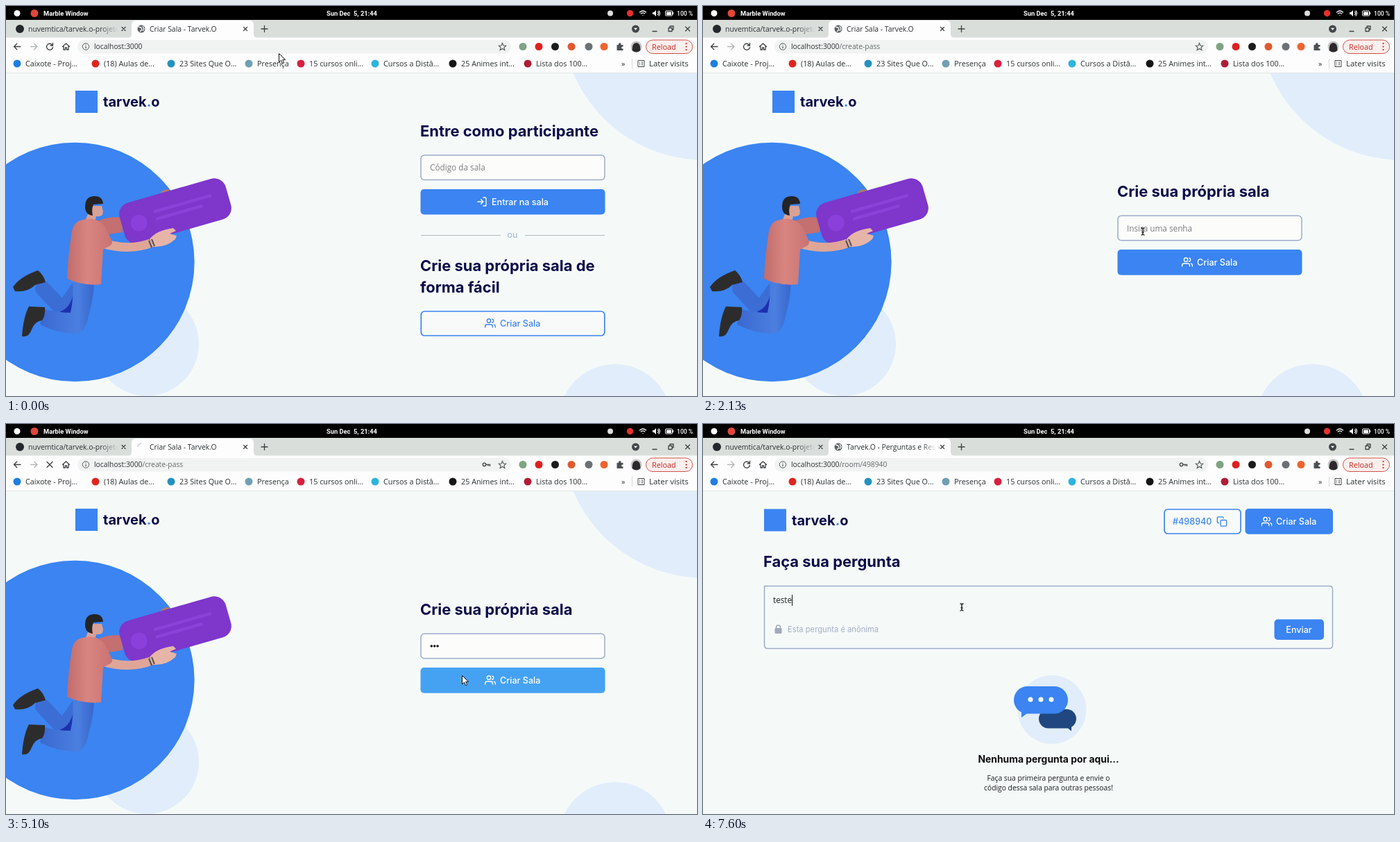
Recreate the animation shown at these times as an HTML page. Size 996x562 px, loop 8 s.

```html
<!DOCTYPE html>
<html lang="pt">
<head>
<meta charset="utf-8">
<title>Sala</title>
<style>
html, body { margin: 0; width: 100%; height: 100%; overflow: hidden; background: #f5faf9; }
svg { display: block; }
#stage { width: 100vw; height: 100vh; }
text { font-optical-sizing: none; white-space: pre; }
.ui { font: 10.8px "Open Sans", sans-serif; fill: #2c2f33; }
.tab { font-size: 10.4px; }
.bar { font: 700 9.3px Roboto, sans-serif; fill: #fff; }
.title { font: 700 21.95px Inter, sans-serif; fill: #0b0b48; }
.brand { font: 700 20px Inter, sans-serif; fill: #0b0b48; }
.label { font: 500 12.6px Inter, sans-serif; fill: currentColor; }
.input { font: 11.75px "Open Sans", sans-serif; fill: #7b7d80; }
.note { font: 10.3px "Open Sans", sans-serif; fill: #17181a; text-anchor: middle; }
.line { fill: none; stroke: currentColor; stroke-linecap: round; stroke-linejoin: round; }
.field { fill: #fcfdfb; stroke: #9dabc9; stroke-width: 1.5; }
.solid { fill: #3b84f1; }
.hover .solid { fill: #45a2f3; }
.outline { fill: #f7faf8; stroke: currentColor; stroke-width: 1.7; }
.hover .outline { fill: #fdfefd; }
.white { color: #fff; }
.blue { color: #3b84f1; }
.blue.hover { color: #45a2f3; }
.pale { fill: #e1edfa; }
</style>
</head>
<body>
<svg id="stage" viewBox="0 0 996 562" preserveAspectRatio="none">
<defs>
  <symbol id="users" viewBox="0 0 24 24"><path class="line" stroke-width="2" d="M17 21v-2a4 4 0 0 0-4-4H5a4 4 0 0 0-4 4v2M23 21v-2a4 4 0 0 0-3-3.9M16 3.1a4 4 0 0 1 0 7.8M13 7a4 4 0 1 1-8 0a4 4 0 1 1 8 0"/></symbol>
  <symbol id="enter" viewBox="0 0 24 24"><path class="line" stroke-width="2" d="M15 3h4a2 2 0 0 1 2 2v14a2 2 0 0 1-2 2h-4M10 17l5-5-5-5M15 12H3"/></symbol>
  <symbol id="copy" viewBox="0 0 24 24"><path class="line" stroke-width="2" d="M11 9h9a2 2 0 0 1 2 2v9a2 2 0 0 1-2 2h-9a2 2 0 0 1-2-2v-9a2 2 0 0 1 2-2M5 15H4a2 2 0 0 1-2-2V4a2 2 0 0 1 2-2h9a2 2 0 0 1 2 2v1"/></symbol>
  <linearGradient id="shirt"><stop stop-color="#c06c6c"/><stop offset=".45" stop-color="#d88581"/><stop offset="1" stop-color="#c97372"/></linearGradient>
  <linearGradient id="jeans"><stop stop-color="#3a68cf"/><stop offset=".7" stop-color="#4b7fe0"/><stop offset="1" stop-color="#3766cb"/></linearGradient>
  <linearGradient id="fadeIdle"><stop stop-color="#dadedb" stop-opacity="0"/><stop offset="1" stop-color="#dadedb"/></linearGradient>
  <linearGradient id="fadeActive"><stop stop-color="#fcfdfc" stop-opacity="0"/><stop offset="1" stop-color="#fcfdfc"/></linearGradient>
</defs>
<rect width="996" height="562" fill="#f5faf9"/>

<g id="landing">
  <circle class="pale" cx="1007" cy="16" r="206"/>
  <circle class="pale" cx="878" cy="597" r="81"/>
  <circle class="pale" cx="203" cy="487" r="75"/>
  <circle class="solid" cx="99.3" cy="369" r="172.3"/>
  <!-- figure carrying the card -->
  <path d="M222 271q4-9 14-6l2 8-14 5z" fill="#b07a72"/>
  <path d="M130 311q17-9 38-6v21l-34 5z" fill="#c46f70"/>
  <g transform="rotate(-16 244 295.5)">
    <rect x="164.5" y="265" width="159" height="61" rx="17" fill="#7e36cb"/>
    <circle cx="189" cy="297.5" r="12" fill="#8b3fdb"/>
    <path class="line" d="M216 288h82M216 299h66" stroke-width="4.5" style="color:#8a42d9"/>
  </g>
  <path class="line" d="M53 407L82 438 103 408" stroke-width="22" style="color:#3c6dd4"/>
  <path d="M78 440q17-4 22-38l-1 42q-11 8-21-4z" fill="#1d31ae"/>
  <path d="M96 394l31 4q-1 24-8 48-4 24-18 26-26 0-52-13l7-22q18 5 37 5 5-22 3-48z" fill="url(#jeans)"/>
  <path d="M10 405Q20 390 46 381q8 6 11 17l-15 4q-11 11-29 9z" fill="#2d2c2c"/>
  <path d="M23 476Q25 448 33 433l23 1q1 12-4 19-10 1-15 13-4 12-14 10z" fill="#2d2c2c"/>
  <path d="M119 288h19l2 8-1 5q-3 3-9 2l-2 9-14-2 4-10z" fill="#d9a196"/>
  <path d="M114 289q0-15 14-15 11 0 12 11l-14 1q-3 7-1 16-11-1-11-13z" fill="#242426"/>
  <path d="M137 333q35 15 69 3l9 10q-36 15-79 2z" fill="#dfa698"/>
  <path d="M207 336q10-13 34-16l4 4-9 4 10 3-2 5q-13 12-31 11z" fill="#e7b5a8"/>
  <path d="M206 338l4 10M210 336l4 10" stroke="#4a4d4e" stroke-width="2"/>
  <path d="M107 309q23-8 36 9l10 21q1 6-8 9l-5 3-3 50q-26 3-49-8 1-29 6-62 2-19 13-22z" fill="url(#shirt)"/>
</g>

<g id="brand">
  <rect class="solid" x="100" y="122" width="32" height="32"/>
  <text class="brand" x="140" y="145">tarvek<tspan fill="#3b84f1">.</tspan>o</text>
</g>

<g id="home">
  <text class="title" x="597" y="188">Entre como participante</text>
  <rect class="field" x="598" y="215" width="265" height="35.5" rx="5"/>
  <text class="input" x="611" y="237">Código da sala</text>
  <g class="white">
    <rect class="solid" x="597.5" y="264" width="266" height="36.5" rx="5"/>
    <use href="#enter" x="678" y="274" width="16" height="16"/>
    <text class="label" x="700" y="286.5">Entrar na sala</text>
  </g>
  <path d="M598 330.5H713M748 330.5H863" stroke="#b3b9be"/>
  <text x="722.5" y="334" class="label" style="font-weight:400;color:#a0b0d5">ou</text>
  <text class="title" x="597" y="382">Crie sua própria sala de</text>
  <text class="title" x="597" y="412.5">forma fácil</text>
  <g class="blue" id="homeButton">
    <rect class="outline" x="598.3" y="440" width="264.5" height="35" rx="5"/>
    <use href="#users" x="690" y="449" width="16" height="16"/>
    <text class="label" x="712" y="461.5">Criar Sala</text>
  </g>
</g>

<g id="create">
  <text class="title" x="597" y="275">Crie sua própria sala</text>
  <rect class="field" x="598" y="302.2" width="265" height="35.5" rx="5"/>
  <text class="input" id="passHint" x="611" y="324.5">Insira uma senha</text>
  <g id="dots" fill="#17181c"><circle cx="613.3" cy="320" r="1.8"/><circle cx="617.7" cy="320" r="1.8"/><circle cx="622.1" cy="320" r="1.8"/></g>
  <g class="white" id="createButton">
    <rect class="solid" x="597.5" y="351" width="266" height="36.8" rx="5"/>
    <use href="#users" x="690" y="361" width="16" height="16"/>
    <text class="label" x="712" y="373.8">Criar Sala</text>
  </g>
</g>

<g id="room">
  <g class="blue">
    <rect class="outline" x="665" y="123" width="110" height="35" rx="5"/>
    <text class="label" x="677" y="144.5">#498940</text>
    <use href="#copy" x="740" y="132.5" width="16" height="16"/>
  </g>
  <g class="white">
    <rect class="solid" x="781.5" y="122" width="126.5" height="36.8" rx="5"/>
    <use href="#users" x="804.5" y="132.5" width="16" height="16"/>
    <text class="label" x="826" y="144.5">Criar Sala</text>
  </g>
  <text class="title" x="87" y="206">Faça sua pergunta</text>
  <path class="field" d="M88.5 233.5H903q4.5 0 4.5 5v80q0 5-5 5H93q-4.5 0-4.5-5z" style="fill:#f5faf9"/>
  <text class="input" id="question" x="101" y="258"></text>
  <rect x="103.5" y="294" width="10" height="8" rx="1.5" fill="#a0a9bd"/>
  <path d="M105.5 294v-1a3 3 0 0 1 6 0v1" fill="none" stroke="#a0a9bd" stroke-width="1.5"/>
  <text x="122" y="300.3" style="font:11.2px Inter,sans-serif;fill:#a5aec4">Esta pergunta é anônima</text>
  <g class="white">
    <rect class="solid" x="823.5" y="281.5" width="71.5" height="29.5" rx="5"/>
    <text class="label" x="859" y="300.5" text-anchor="middle">Enviar</text>
  </g>
  <circle class="pale" cx="503" cy="411.5" r="49.5"/>
  <g fill="#20477f"><rect x="484" y="411" width="54" height="27.5" rx="13.7"/><path d="M523 436h8v6.5z"/></g>
  <g class="solid"><rect x="448" y="378" width="78" height="39.5" rx="19.7"/><path d="M459 413v10l11-8z"/></g>
  <g fill="#fff"><circle cx="472" cy="397" r="3.5"/><circle cx="487" cy="397" r="3.5"/><circle cx="502" cy="397" r="3.5"/></g>
  <text x="498" y="488" text-anchor="middle" style="font:700 13.9px Inter,sans-serif;fill:#0d0d0f">Nenhuma pergunta por aqui...</text>
  <text class="note" x="498" y="514">Faça sua primeira pergunta e envie o</text>
  <text class="note" x="498" y="528">código dessa sala para outras pessoas!</text>
</g>
<rect id="caret" width="1" height="16" fill="#111"/>

<!-- desktop bar and browser frame -->
<rect width="996" height="20" fill="#000"/>
<circle cx="16" cy="10.5" r="4.5" fill="#fff"/>
<circle cx="41" cy="10.5" r="5.5" fill="#e0473a"/>
<text class="bar" x="54" y="13.8">Marble Window</text>
<text class="bar" x="462" y="13.8">Sun Dec  5, 21:44</text>
<circle cx="871" cy="10.5" r="4" fill="#ddd"/>
<circle cx="899.5" cy="10.5" r="4.7" fill="#e5322d"/>
<g class="line white" stroke-width="1.2"><path d="M913.5 9q4.5-4 9 0M915.3 11q2.7-2.3 5.4 0M918 13.3v.1M939.5 8.5q2 2 0 4M941 7q3 3.5 0 7"/></g>
<path d="M932 9h2l3-3v9l-3-3h-2zM952 8.5h7v4.500h-7z" fill="#fff"/>
<rect x="950.5" y="7" width="10" height="7" rx="1" fill="none" stroke="#fff"/><path d="M961.5 9v3" stroke="#fff"/>
<text class="bar" x="967" y="13.5" style="font-size:8.6px;font-weight:500">100 %</text>

<rect y="20" width="996" height="26" fill="#dadedb"/>
<rect y="45.5" width="996" height="51" fill="#fcfdfc"/>
<path d="M0 96.500H996" stroke="#e3e7e6"/>
<path d="M175 46q6 0 6-6V27q0-6 6-6H351q6 0 6 6v13q0 6 6 6z" fill="#fcfdfc"/>
<circle cx="20" cy="33" r="6" fill="#24282d"/>
<text class="ui tab" x="32" y="36.8">nuvemtica/tarvek.o-projeto</text>
<rect x="136" y="25" width="26" height="17" fill="url(#fadeIdle)"/><rect x="161.5" y="25" width="4" height="17" fill="#dadedb"/>
<text class="ui tab" id="tabTitle" x="207" y="36.8"></text>
<rect x="316" y="25" width="19" height="17" fill="url(#fadeActive)"/><rect x="334.5" y="25" width="6" height="17" fill="#fcfdfc"/>
<g id="globe"><circle cx="195" cy="33" r="5.5" fill="#5b6065"/><path d="M191 30l4 1 1 3-3 3M197 29l2 4-2 3" fill="none" stroke="#fff" stroke-width="1.3"/></g>
<path id="spinner" d="M190 33a5 5 0 0 1 5-5" fill="none" stroke="#c3ccd2" stroke-width="1.3"/>
<g class="line" stroke-width="1.3" style="color:#3c4043">
  <path d="M167 30.5l5 5m0-5l-5 5M342.5 30.5l5 5m0-5l-5 5M368 33h9M372.5 28.5v9"/>
  <path d="M932 36.5h6M955 31.5h5v5h-5zM957 31v-2h5v5h-2M979.5 30l6 6m0-6l-6 6"/>
  <path d="M21 58.5H11.5l4.3-4.3M11.5 58.5l4.3 4.3"/>
  <path d="M35.5 58.5H45l-4.3-4.3M45 58.5l-4.3 4.3" stroke="#b3b7b9"/>
  <path id="reload" d="M66.8 56.3a4.5 4.5 0 1 0 .7 3M67.5 53.5v3.5H64"/>
  <path id="stop" d="M59 54.5l8 8m0-8l-8 8"/>
  <path d="M81.5 58.5l5-4.5 5 4.5M83 58v5h2.5v-3h2v3H90v-5"/>
</g>
<circle cx="907.5" cy="33" r="5.5" fill="#44484b"/><path d="M905 31.8h5l-2.5 3z" fill="#fff"/>
<rect x="103" y="49" width="625" height="19.5" rx="9.7" fill="#f0f3f1"/>
<circle cx="115" cy="58.5" r="4.7" fill="none" stroke="#55595d"/><path d="M115 58v3M115 55.8v1" stroke="#55595d" stroke-width="1.2"/>
<text class="ui" style="font-size:10.3px" x="127" y="62.2">localhost:3000<tspan id="path" fill="#64686c"></tspan></text>
<g id="key" fill="none" stroke="#505458" stroke-width="1.5"><circle cx="689.5" cy="58.5" r="2.2"/><path d="M692 58.5h5.5v2.5M695 58.5v2"/></g>
<path d="M715.5 53.5l1.500 3.5 3.7.3-2.8 2.5.9 3.7-3.300-2-3.300 2 .9-3.7-2.8-2.500 3.700-.3z" fill="none" stroke="#505458" stroke-width="1.1"/>
<g id="extensions"></g>
<path d="M880.5 56h2.5q-.5-2.8 1.800-2.8T886.5 56h3v2.5q-2.5-.2-2.5 1.5t2.5 1.5V64h-9z" fill="#4c5054"/>
<circle cx="908.5" cy="58.5" r="8" fill="#c9c6c6"/><path d="M902.5 64q0-11 6-11t6 11q-6 5-12 0z" fill="#2b292c"/>
<rect x="922.5" y="49" width="67" height="19.5" rx="9.7" fill="#fcefed" stroke="#cf5148"/>
<text class="ui" x="931" y="62.5" style="fill:#c5271f;font-weight:500">Reload</text>
<path d="M980.5 54v.1M980.5 58.5v.1M980.5 63v.1" class="line" stroke-width="2.2" style="color:#c5271f"/>
<g id="bookmarks"></g>
<text class="ui" x="887" y="86.5">»</text>
<path d="M902.5 76v14" stroke="#d5d9d8"/>
<path d="M911 78.5h9v9h-9zM913 81h1m2 0h2M913 83h1m2 0h2M913 85h1m2 0h2" fill="none" stroke="#44484b"/>
<text class="ui" x="927" y="86.8" style="font-size:11.4px">Later visits</text>

<g id="pointer">
  <path id="arrow" d="M.5.5v12.5l3-2.8 2 4.6 2.2-1-2-4.4h4z" fill="#fff" stroke="#111"/>
  <path id="hand" d="M-1.5 6V1q1.3-1.7 2.6 0v3.5l4 1q1.5.5 1.3 2L5.5 12H-1L-4.500 8q.3-2 2-1z" fill="#fff" stroke="#111"/>
  <path id="beam" d="M-2.5-5q2 0 2.5 1 .5-1 2.5-1M0-4V4M-2.5 5q2 0 2.5-1 .5 1 2.5 1M-1.5 1h3" fill="none" stroke="#222" stroke-width="1.5"/>
</g>
</svg>
<script>
const $ = id => document.getElementById(id);
const show = (id, on) => { $(id).style.display = on ? "" : "none"; };
const LOOP = 8000, BLINK = 600;
const CREATE_AT = 1770, FOCUS_AT = 2300, LOAD_AT = 4900, ROOM_AT = 5270, ASK_AT = 6200;
const dotTimes = [2970, 3300, 3530];
const letterTimes = [7270, 7340, 7400, 7500, 7600];
const pointerPath = [
  [500, 393, 68], [1130, 700, 400], [1300, 700, 400], [1560, 738, 454], [CREATE_AT, 738, 454],
  [2100, 634, 325], [4430, 634, 325], [4750, 657, 362], [ROOM_AT, 657, 362],
  [5880, 495, 306], [6000, 495, 306], [6070, 373, 264]
];

$("bookmarks").innerHTML = [
  [16, "#1f7fe0", "Caixote - Proj…"], [129, "#e0241f", "(18) Aulas de…"], [238, "#2492c0", "23 Sites Que O…"],
  [350, "#6f9fb0", "Presença"], [425, "#d8203f", "15 cursos onli…"], [532, "#2eb4dc", "Cursos a Distâ…"],
  [644, "#151515", "25 Animes int…"], [752, "#b01c36", "Lista dos 100…"]
].map(([x, color, label]) => `<circle cx="${x}" cy="83" r="5.5" fill="${color}"/>
  <text class="ui" x="${x + 12}" y="86.8">${label}</text>`).join("");

$("extensions").innerHTML = [
  [745, "#7fa382"], [768, "#df2020"], [791.5, "#1b1b1b"], [815, "#e0592f"], [840, "#6c7176"], [862, "#ed6430"]
].map(([x, color]) => `<circle cx="${x}" cy="58.5" r="5.5" fill="${color}"/>`).join("");

function pointerAt(t) {
  const next = pointerPath.findIndex(p => p[0] > t);
  if (next < 1) return pointerPath.at(next).slice(1);
  const [t0, x0, y0] = pointerPath[next - 1], [t1, x1, y1] = pointerPath[next];
  const k = (t - t0) / (t1 - t0), e = k * k * (3 - 2 * k);
  return [x0 + (x1 - x0) * e, y0 + (y1 - y0) * e];
}

const countBefore = (times, t) => times.filter(time => time <= t).length;
const blinkOn = (t, focus, times) => {
  const last = Math.max(focus, ...times.filter(time => time <= t));
  return t >= focus && Math.floor((t - last) / BLINK) % 2 === 0;
};

function draw(t) {
  const page = t < CREATE_AT ? 0 : t < ROOM_AT ? 1 : 2;
  const loading = t >= LOAD_AT && t < ROOM_AT;
  ["home", "create", "room"].forEach((id, i) => show(id, i === page));
  show("landing", page < 2);
  $("brand").setAttribute("transform", page === 2 ? "translate(-12 .5)" : "");
  $("tabTitle").textContent = page === 2 ? "Tarvek.O - Perguntas e Resp" : "Criar Sala - Tarvek.O";
  $("path").textContent = ["", "/create-pass", "/room/498940"][page];
  show("key", t >= FOCUS_AT);
  show("globe", !loading);
  show("spinner", loading);
  show("reload", !loading);
  show("stop", loading);
  $("spinner").setAttribute("transform", `rotate(${(t - 5100) * .36} 195 33)`);

  const dots = countBefore(dotTimes, t), letters = countBefore(letterTimes, t);
  show("passHint", dots === 0);
  [...$("dots").children].forEach((dot, i) => { dot.style.display = i < dots ? "" : "none"; });
  $("question").textContent = letters ? "teste".slice(0, letters) : "O que você quer perguntar?";
  $("question").style.fill = letters ? "#222528" : "#a5b1cf";

  const caretOn = page === 1 ? t < 4430 && blinkOn(t, FOCUS_AT, dotTimes) : page === 2 && blinkOn(t, ASK_AT, letterTimes);
  show("caret", caretOn);
  if (caretOn) {
    const x = page === 1 ? 611 + 4.4 * dots : 101 + (letters ? $("question").getComputedTextLength() : 0);
    $("caret").setAttribute("x", x);
    $("caret").setAttribute("y", page === 1 ? 312 : 246);
  }

  const [x, y] = pointerAt(t);
  const inside = (left, top, right, bottom) => x > left && x < right && y > top && y < bottom;
  const overHome = page === 0 && inside(598, 440, 863, 475);
  const overCreate = page === 1 && inside(598, 351, 863, 388);
  const overText = page === 0 ? inside(598, 215, 863, 250)
    : page === 1 ? inside(598, 302, 863, 338) : inside(101, 242, 895, 275);
  $("homeButton").classList.toggle("hover", overHome);
  $("createButton").classList.toggle("hover", overCreate);
  const kind = overText ? "beam" : (overHome || overCreate) && !loading ? "hand" : "arrow";
  ["arrow", "hand", "beam"].forEach(id => show(id, id === kind));
  $("pointer").setAttribute("transform", `translate(${x} ${y})`);
}

const start = performance.now();
(function tick() {
  draw((performance.now() - start) % LOOP);
  requestAnimationFrame(tick);
})();
</script>
</body>
</html>
```
